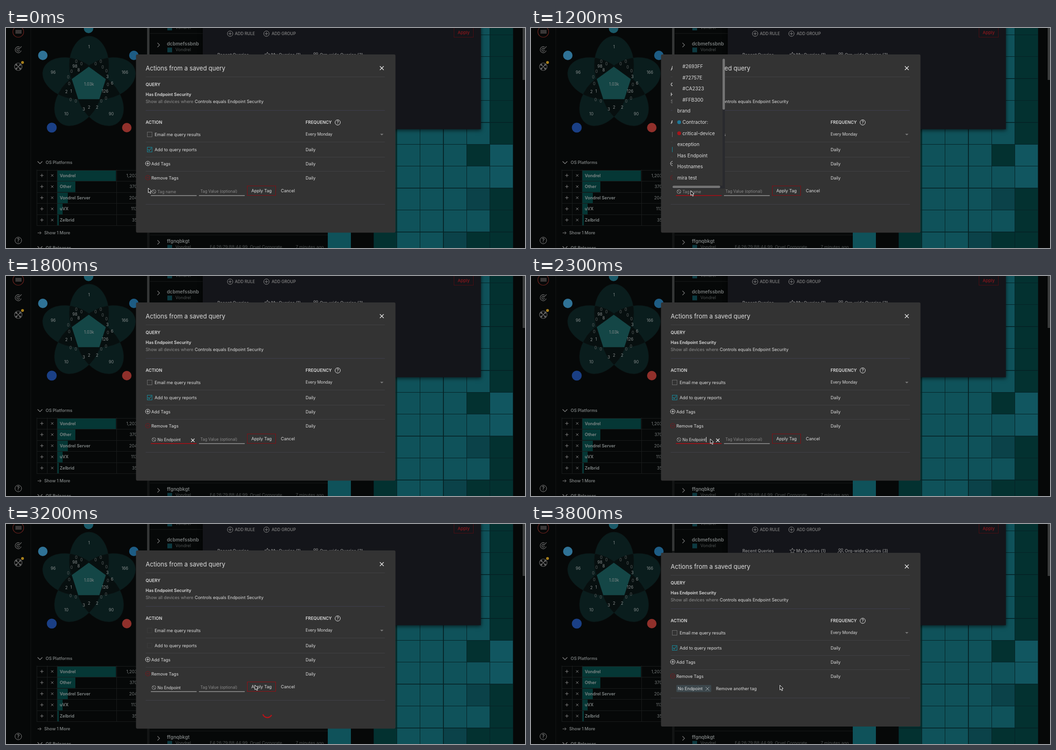
Animation of 1100x466 px, one loop 5.8 s. Source, as an HTML page with a canvas:

```html
<!DOCTYPE html>
<html lang="en">
<head>
<meta charset="utf-8">
<title>Saved query actions</title>
<style>
html, body { margin: 0; width: 100%; height: 100%; overflow: hidden; background: #060808; }
canvas { display: block; width: 1100px; height: 466px; }
</style>
</head>
<body>
<canvas id="stage" width="1100" height="466"></canvas>
<script>
const g = document.getElementById('stage').getContext('2d');
const LOOP = 5800, TAU = Math.PI * 2;
const WHITE = '#dedede', GREY = '#777b7b', DIM = '#4c5050', RED = '#a80e15', BACK = '#060808';

function text(str, x, y, size, color = WHITE, weight = 400, align = 'left') {
  g.font = `${weight} ${size}px Inter, sans-serif`;
  g.textAlign = align;
  g.fillStyle = color;
  g.fillText(str, x, y + size * 0.36);
}

function rect(x, y, w, h, color) {
  g.fillStyle = color;
  g.fillRect(x, y, w, h);
}

function frame(x, y, w, h, color) {
  g.strokeStyle = color;
  g.lineWidth = 1;
  g.strokeRect(x + 0.5, y + 0.5, w - 1, h - 1);
}

function line(points, color, width = 1) {
  g.beginPath();
  points.forEach(([x, y]) => g.lineTo(x, y));
  g.strokeStyle = color;
  g.lineWidth = width;
  g.stroke();
}

function ring(x, y, r, color, width = 1) {
  g.beginPath();
  g.arc(x, y, r, 0, TAU);
  g.strokeStyle = color;
  g.lineWidth = width;
  g.stroke();
}

function dot(x, y, r, color) {
  g.beginPath();
  g.arc(x, y, r, 0, TAU);
  g.fillStyle = color;
  g.fill();
}

function cross(x, y, r, color, width = 1) {
  line([[x - r, y - r], [x + r, y + r]], color, width);
  line([[x - r, y + r], [x + r, y - r]], color, width);
}

function plus(x, y, r, color) {
  line([[x - r, y], [x + r, y]], color);
  line([[x, y - r], [x, y + r]], color);
}

function plusRing(x, y, r, color) {
  ring(x, y, r, color);
  plus(x, y, r * 0.6, color);
}

function chevron(x, y, down, color) {
  line(down ? [[x - 5, y - 2.5], [x, y + 2.5], [x + 5, y - 2.5]]
            : [[x - 2, y - 4.5], [x + 2.5, y], [x - 2, y + 4.5]], color, 1.2);
}

function help(x, y, r, color) {
  ring(x, y, r, color);
  text('?', x, y, r * 1.6, color, 500, 'center');
}

function sidebar() {
  ring(26, 8, 11.5, '#70241f', 1.2);
  rect(20, 4, 13, 8, '#3a3737');
  for (const r of [3, 6.5]) {
    g.beginPath();
    g.arc(26, 46, r, 0.3, TAU - 1.1);
    g.strokeStyle = '#666';
    g.lineWidth = 1.3;
    g.stroke();
  }
  line([[26, 46], [33, 39]], '#666', 1.3);
  ring(26, 82, 8, '#666', 1.2);
  cross(26, 82, 4, '#666', 1.2);
  for (const [dx, dy] of [[-4, -4], [4, -4], [-4, 4], [4, 4]]) dot(26 + dx, 82 + dy, 2, '#666');
  dot(35, 73, 3, '#a8801c');
  help(26, 450, 7, '#858585');
  rect(52, 0, 1, 466, '#121414');
}

function petal(k) {
  const a = -TAU / 4 + k * TAU / 5;
  g.beginPath();
  g.ellipse(176 + 40 * Math.cos(a), 119 + 40 * Math.sin(a), 62, 42, a, 0, TAU);
}

function venn() {
  for (let k = 0; k < 5; k++) {
    petal(k);
    g.fillStyle = '#0a1d1d';
    g.fill();
  }
  for (let k = 0; k < 5; k++) {
    g.save();
    petal(k);
    g.clip();
    petal(k + 1);
    g.fillStyle = '#070f0f';
    g.fill();
    g.restore();
  }
  for (let k = 0; k < 5; k++) {
    petal(k);
    g.strokeStyle = '#0c1818';
    g.lineWidth = 0.7;
    g.stroke();
  }
  g.beginPath();
  for (let k = 0; k < 5; k++) {
    const a = -TAU / 4 + k * TAU / 5;
    g.lineTo(175.5 + 38 * Math.cos(a), 120 + 38 * Math.sin(a));
  }
  g.closePath();
  g.fillStyle = '#144646';
  g.fill();

  const num = (s, x, y, c = '#858b8b') => text(s, x, y, 8.5, c, 400, 'center');
  num('1.03k', 176, 119);
  num('1', 176, 40); num('96', 100, 94); num('166', 252, 94);
  num('10', 128, 182); num('90', 223, 182);
  num('98', 146, 81); num('8', 154, 89); num('3', 215, 103);
  num('6', 225, 117); num('126', 210, 134); num('2', 128, 135);
  num('1', 138, 134); num('3', 165, 172); num('2', 176, 168); num('2', 193, 168);
  const zeros = [[149, 71], [160, 76], [190, 76], [201, 71], [205, 83], [213, 91], [139, 92],
    [132, 104], [134, 118], [137, 152], [148, 155], [202, 155], [212, 149], [216, 120]];
  for (const [x, y] of zeros) num('0', x, y, '#5a6060');

  dot(175, 1, 10, '#1a5968');
  dot(78, 58, 10, '#2f7296');
  dot(271, 58, 10, '#1d5c84');
  dot(97, 211, 10.5, '#1a3f85');
  dot(256, 211, 10, '#90302b');
}

function platforms() {
  chevron(72, 285, true, '#888');
  text('OS Platforms', 84, 285, 9, GREY, 600);
  const rows = [['Vondrel', 124, '1,203'], ['Other', 38, '370'], ['Vondrel Server', 22, '204'],
    ['uVX', 11, '113'], ['Zelbrid', 3, '35']];
  rows.forEach(([name, w, count], i) => {
    const y = 300.5 + i * 23.6, mid = y + 11.8;
    rect(109, y + 0.5, w, 23, '#053735');
    rect(65, Math.round(y), 212, 1, '#191c1c');
    plus(76, mid, 3.5, '#858585');
    cross(98, mid, 2.5, '#858585');
    text(name, 114, mid, 9, '#848a8a', 600);
    text(count, 278, mid, 9, GREY, 400, 'right');
  });
  rect(65, 418, 212, 1, '#191c1c');
  for (const x of [65, 87, 108, 234]) rect(x, 300, 1, 118, '#191c1c');
  line([[67, 434], [74, 434]], '#888');
  line([[71.5, 431], [74.5, 434], [71.5, 437]], '#888');
  text('Show 1 More', 81, 434, 9, GREY, 600);
  chevron(72, 465, true, '#888');
  text('OS Releases', 84, 466, 9, GREY, 600);
}

function device(name, y) {
  chevron(323, y + 2.5, false, '#777');
  text(name, 341, y, 10.2, GREY, 600);
  osLabel(y + 12);
}

function osLabel(y) {
  rect(342, y - 4, 10, 10, '#0d3a41');
  text('Vondrel', 359, y, 9.1, DIM);
}

function table() {
  rect(299, 0, 5, 466, '#131515');
  rect(299, 0, 5, 57, '#343636');
  osLabel(-1);
  rect(305, 11, 112, 1, '#171919');
  device('dcbmefssbnb', 33.5);
  rect(305, 438, 377, 1, '#171919');
  device('ffgnqbkgt', 451.5);
  text('E4:26:79:B8:44:99, Orvel Corporate', 432, 463.5, 9, DIM);
  text('7 minutes ago', 614, 463.5, 9, DIM);
}

function heatmap() {
  const tint = { L: '#0f525a', M: '#115660', m: '#0b4249', D: '#033130' };
  const rows = ['LLLLLD', 'LLLLLD', 'LLLLLD', 'LLLLLD', 'LLLLLD', 'DLLLLD',
    'DLLLDM', 'DLLLLM', 'DLLLmD', 'DLLLLD', 'DLLmDD'];
  rows.forEach((row, j) => [...row].forEach((c, i) => {
    const x = Math.floor(779.6 + i * 49.17), y = Math.round(14 + (j - 1) * 46.4);
    rect(x, y, 50, 47, '#052225');
    rect(x + 1, y + 1, 48.2, 45.4, tint[c]);
  }));
  rect(1075, 0, 25, 466, BACK);
  rect(682, 386, 49, 80, tint.L);
  rect(1095, 0, 5, 110, '#3a3c3c');
}

function queryPanel() {
  g.save();
  g.shadowColor = 'rgba(0,0,0,.6)';
  g.shadowBlur = 8;
  g.shadowOffsetY = 2;
  rect(417, -10, 589.5, 224.5, '#14151a');
  g.restore();
  plusRing(475, 12, 5.8, '#858585');
  text('ADD RULE', 485, 12, 8.6, '#858585', 500);
  plusRing(552, 12, 5.8, '#858585');
  text('ADD GROUP', 563, 12, 8.6, '#858585', 500);
  frame(949, -1, 42, 21, '#4c0d12');
  text('Apply', 970, 9.5, 9.2, '#8c161c', 500, 'center');
  text('Recent Queries', 448, 57, 9, '#858585', 600);
  g.beginPath();
  for (let k = 0; k < 10; k++) {
    const a = -TAU / 4 + k * TAU / 10, r = k % 2 ? 2.6 : 6;
    g.lineTo(554 + r * Math.cos(a), 57 + r * Math.sin(a));
  }
  g.closePath();
  g.strokeStyle = '#858585';
  g.lineWidth = 1;
  g.stroke();
  text('My Queries (1)', 562, 56.5, 9, '#858585', 600);
  for (const x of [654, 659]) {
    ring(x, 54, 2, '#858585');
    g.beginPath();
    g.arc(x, 61, 3.5, Math.PI, TAU);
    g.stroke();
  }
  text('Org-wide Queries (3)', 665, 56.5, 9, '#858585', 600);
}

function checkbox(y, checked, faded) {
  const color = faded ? '#3b3b3b' : checked ? '#16899a' : '#6c6c6c';
  frame(299, y - 5, 11, 11, color);
  if (checked && !faded) line([[301, y], [303.5, y + 3], [308, y - 3]], color, 1.2);
}

function noEntry(x, y) {
  ring(x, y, 4, '#a0a0a0');
  line([[x - 2.8, y - 2.8], [x + 2.8, y + 2.8]], '#a0a0a0');
}

function modalBase(s) {
  g.beginPath();
  g.roundRect(275.5, 56, 550, s.done ? 368 : 377.5, 3);
  g.fillStyle = '#333';
  g.fill();
  text('Actions from a saved query', 296, 85.5, 13);
  cross(796.5, 85, 4, '#f0f0f0', 1.2);
  text('QUERY', 296, 120, 9, WHITE, 600);
  text('Has Endpoint Security', 296, 140.5, 9, WHITE, 600);
  text('Show all devices where', 296, 156, 9.1, '#8e8e8e');
  text('Controls equals Endpoint Security', 400, 156, 9.1);
  text('ACTION', 296, 200, 9, WHITE, 600);
  text('FREQUENCY', 635, 200, 9, WHITE, 600);
  help(703, 200, 5.6, WHITE);
  for (const y of [103, 241, 273, 303]) rect(296, y, 507, 1, '#404043');
  rect(296, 174, 507, 1, '#3d3d4d');
  rect(296, s.done ? 363 : 373, 507, 1, '#404048');
  checkbox(225, false, s.busy);
  text('Email me query results', 315, 225.5, 9.1);
  text('Every Monday', 635, 225, 8.4);
  g.beginPath();
  g.moveTo(793, 224);
  g.lineTo(800, 224);
  g.lineTo(796.5, 227.5);
  g.fillStyle = '#777';
  g.fill();
  checkbox(257, true, s.busy);
  text('Add to query reports', 315, 257.5, 9.1);
  plusRing(300.5, 287, 4.8, WHITE);
  text('Add Tags', 308, 287.5, 9.1);
  ring(300.5, 317, 4.8, '#7d1419');
  line([[298, 317], [303, 317]], '#7d1419');
  text('Remove Tags', 308, 317.5, 9.1);
  for (const y of [257.5, 287.5, 317.5]) text('Daily', 635, y, 9.1);
}

function tagForm(s) {
  noEntry(313.5, 346.5);
  text(s.value || 'Tag name', 321, 346.5, 8.5, s.value ? WHITE : '#8a8a8a');
  if (s.caret) {
    g.font = '400 8.5px Inter, sans-serif';
    rect(321 + (s.value ? g.measureText(s.value).width + 0.5 : 0), 341, 1, 11, '#eee');
  }
  if (s.line === 'focus') rect(307, 354, 97, 1.6, RED);
  else if (s.line === 'hover') rect(307, 354, 97, 2, '#e4e4e4');
  else rect(307, 354.5, 97, 1, '#c8c8c8');
  if (s.value && s.line === 'focus') cross(396, 348, 3.5, '#f0f0f0', 1.3);
  text('Tag Value (optional)', 412, 346, 8.3, '#8a8a8a');
  rect(409, 354.5, 97, 1, '#c8c8c8');
  frame(511, 334, 61, 21, s.press ? '#960d13' : '#840d13');
  text('Apply Tag', 541.5, 345, 9.1, WHITE, 400, 'center');
  text('Cancel', 582.5, 345, 9.1);
}

function tagList() {
  rect(300, 62, 111, 278, '#333');
  const items = ['#2693FF', '#72757E', '#CA2323', '#FFB300', 'brand', 'Contractor:', 'critical-device',
    'exception', 'Has Endpoint', 'Hostnames', 'mira test'];
  items.forEach((name, i) => {
    const tinted = i < 4 || i === 5 || i === 6;
    text(name, tinted ? 321 : 310, 81.5 + i * 23.58, 10.2);
  });
  dot(314, 199.5, 4, '#1c7898');
  dot(314, 223, 4, '#a8151b');
  rect(406, 65, 5, 275, '#292a2e');
  rect(300, 334, 111, 6, '#292a2e');
  g.fillStyle = '#737373';
  g.beginPath();
  g.roundRect(406, 65, 5, 108, 2.5);
  g.roundRect(300, 334, 101, 5, 2.5);
  g.fill();
}

function spinner(t) {
  const turn = Math.floor((t - 3600) / 200) * TAU / 5;
  g.beginPath();
  g.arc(554, 400, 10, turn + Math.PI * 0.95, turn + Math.PI * 1.7);
  g.strokeStyle = '#b51419';
  g.lineWidth = 2.4;
  g.stroke();
}

function tagChip() {
  g.beginPath();
  g.roundRect(308, 341, 74, 15, 2);
  g.fillStyle = '#3c474c';
  g.fill();
  text('No Endpoint', 311, 349, 9.1);
  cross(374, 349, 3.8, '#a5adb0');
  text('Remove another tag', 392, 348.5, 9.1);
}

function pointer(x, y) {
  g.beginPath();
  [[0, 0], [0, 10], [2.3, 8], [4, 11.6], [5.8, 10.8], [4.2, 7.3], [7, 7]]
    .forEach(([dx, dy]) => g.lineTo(x + dx, y + dy));
  g.closePath();
  g.fillStyle = '#1b1b1b';
  g.fill();
  g.strokeStyle = '#f2f2f2';
  g.lineWidth = 1;
  g.stroke();
}

// Each step holds until the next one starts.
const steps = [
  { at: 0, mouse: [301.5, 339] },
  { at: 500, mouse: [326, 343] },
  { at: 700, mouse: [338.5, 344.5], line: 'hover' },
  { at: 1200, mouse: [338.5, 344.5], line: 'focus', list: true },
  { at: 1400, mouse: [338.5, 344.5], line: 'focus', list: true, caret: true },
  { at: 1600, line: 'focus', value: 'No En', caret: true },
  { at: 1800, line: 'focus', value: 'No Endpoint' },
  { at: 2300, mouse: [380, 345], line: 'focus', value: 'No Endpoint', caret: true },
  { at: 2500, mouse: [470, 343], line: 'focus', value: 'No Endpoint' },
  { at: 2700, mouse: [527.5, 341], line: 'focus', value: 'No Endpoint', caret: true, press: true },
  { at: 3200, mouse: [527.5, 341], value: 'No Endpoint', busy: true, press: true },
  { at: 3800, mouse: [527.5, 341.5], done: true }
];

function draw(t) {
  const s = steps.filter(step => step.at <= t).pop();
  rect(0, 0, 1100, 466, BACK);
  sidebar();
  venn();
  platforms();
  table();
  heatmap();
  queryPanel();

  g.save();
  if (s.done) g.translate(0, 5);
  modalBase(s);
  g.restore();
  if (s.done) tagChip();
  else tagForm(s);
  if (s.list) tagList();
  if (s.busy) spinner(t);
  if (s.mouse) pointer(...s.mouse);
}

const start = performance.now();
function tick() {
  draw((performance.now() - start) % LOOP);
  requestAnimationFrame(tick);
}
tick();
</script>
</body>
</html>
```
